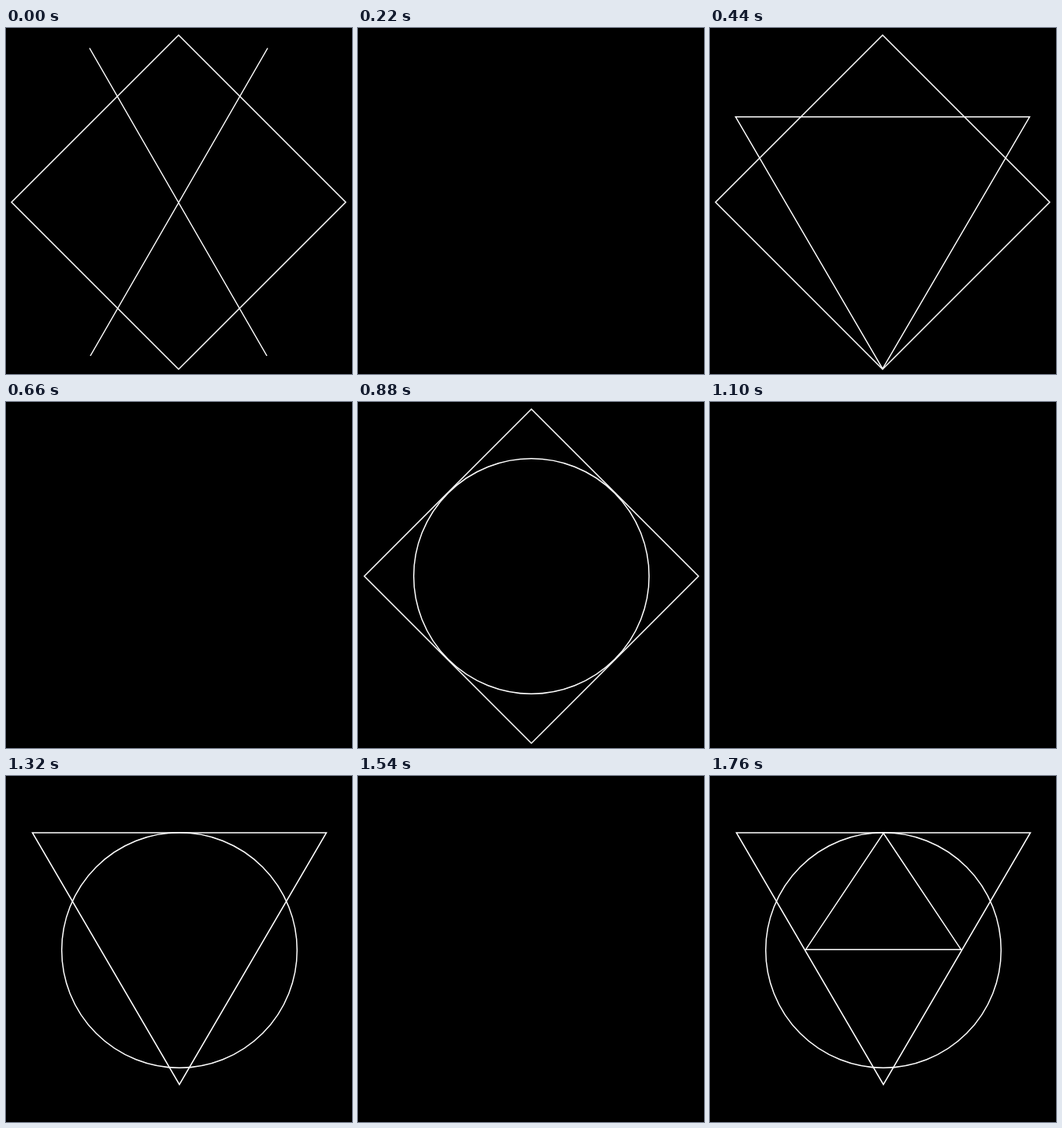
Recreate the animation shown at these times as an HTML page. Size 439x439 px, loop 1980 ms.

```html
<!DOCTYPE html>
<html lang="en">
<head>
<meta charset="utf-8">
<title>Line figures</title>
<style>
  html, body { margin: 0; width: 100%; height: 100%; overflow: hidden; background: #000; }
  svg { display: block; width: 100%; height: 100%; }
  g { fill: none; stroke: #fff; stroke-width: 1.5; visibility: hidden; }
</style>
</head>
<body>
<svg viewBox="0 0 439 439">
  <defs>
    <path id="diamond" d="M0-212L212 0L0 212L-212 0Z"/>
    <path id="triangle" d="M-186.5 0H186.5L0 319.5Z"/>
    <circle id="circle" r="149.3"/>
  </defs>
  <g>
    <use href="#diamond" x="219" y="221"/>
    <path d="M106 25.5L331 416M332 25.5L107 416"/>
  </g>
  <g>
    <use href="#diamond" x="219" y="221"/>
    <use href="#triangle" x="219" y="112.8"/>
  </g>
  <g>
    <use href="#diamond" x="220" y="221"/>
    <use href="#circle" x="220" y="221"/>
  </g>
  <g>
    <use href="#triangle" x="220" y="72"/>
    <use href="#circle" x="220" y="221"/>
  </g>
  <g>
    <use href="#triangle" x="220" y="72"/>
    <use href="#circle" x="220" y="221"/>
    <path d="M220 72.5L318.5 220.2H121.5Z"/>
  </g>
</svg>
<script>
  const STEP = 220, STEPS = 9;
  const figures = document.querySelectorAll("g");

  // Figures sit on even steps, with a black step between them.
  function draw() {
    const step = Math.floor(performance.now() / STEP) % STEPS;
    figures.forEach((figure, i) => {
      figure.style.visibility = step === 2 * i ? "visible" : "hidden";
    });
    requestAnimationFrame(draw);
  }
  draw();
</script>
</body>
</html>
```
